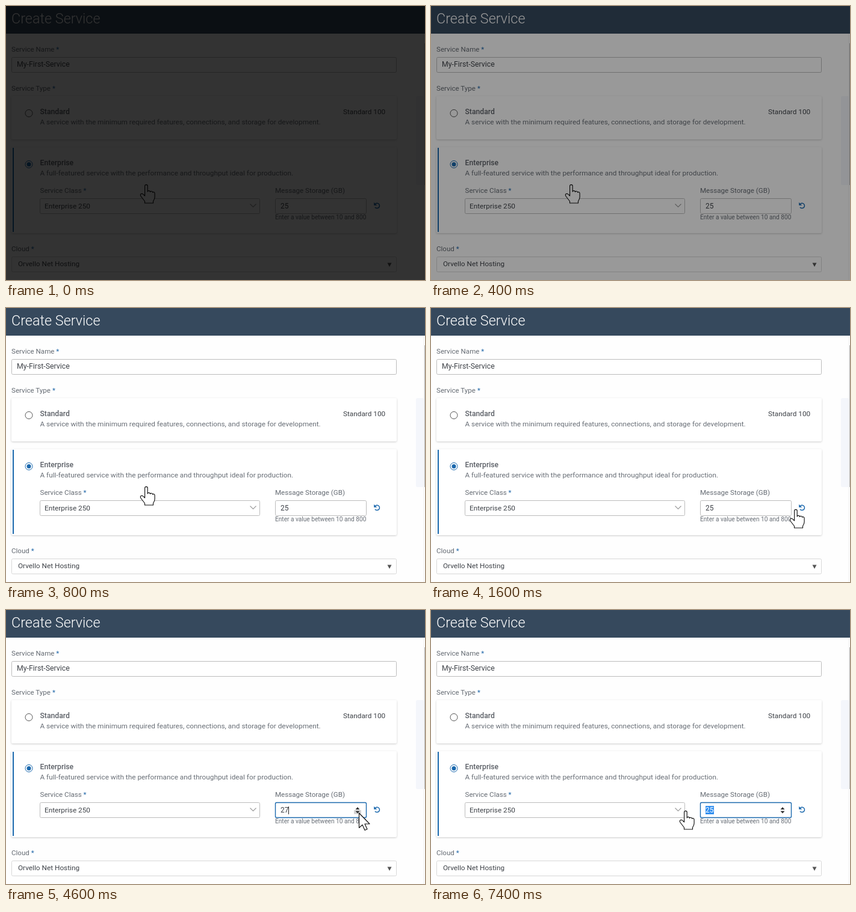
An HTML page that plays this animation: 696 px wide and 456 px high, repeating every 8 s.

```html
<!DOCTYPE html>
<html lang="en">
<head>
<meta charset="utf-8">
<title>Create Service</title>
<style>
  html, body { margin: 0; width: 100%; height: 100%; overflow: hidden; background: #fefefe; }
  svg { display: block; }
  text { font: 11.8px Roboto, sans-serif; fill: #3d4147; }
  .title { font-size: 23.4px; font-weight: 350; fill: #fff; }
  .label { font-size: 11.6px; fill: #666c74; }
  .label tspan { fill: #1f66a8; }
  .name { font-size: 12.2px; font-weight: 500; fill: #5c6067; }
  .note { fill: #686e76; }
  .hint { font-size: 10.15px; fill: #686e76; }
  .field { fill: #fff; stroke: #bcbcbc; }
  .card { fill: #fff; filter: drop-shadow(0 1px 1.5px #0003); }
  .line { fill: none; stroke: #999; stroke-width: 1.1; }
  .blue { fill: #1a68ad; }
  .cursor path { fill: #fff; stroke: #111; stroke-width: 1.15; stroke-linejoin: round; }
</style>
</head>
<body>
<svg width="696" height="456" viewBox="0 0 696 456">
  <rect width="696" height="456" fill="#fefefe"/>
  <rect x="681" y="150" width="13" height="148" rx="2" fill="#f4f6fb"/>
  <path d="M694 46V456" stroke="#f1f1f1"/>
  <path d="M695.5 62V298" stroke="#b4b4b4"/>
  <rect width="696" height="46" fill="#36495d"/>
  <text class="title" x="9" y="29">Create Service</text>

  <text class="label" x="9" y="76">Service Name <tspan>*</tspan></text>
  <rect class="field" x="9.5" y="85.5" width="639" height="25" rx="2"/>
  <text x="18" y="101" style="font-size:12.3px">My-First-Service</text>

  <text class="label" x="9" y="141">Service Type <tspan>*</tspan></text>
  <rect class="card" x="9" y="150" width="640" height="72" rx="2"/>
  <circle cx="38" cy="178.5" r="6" fill="#fff" stroke="#555"/>
  <text class="name" x="56.5" y="180">Standard</text>
  <text class="note" x="56.5" y="197">A service with the minimum required features, connections, and storage for development.</text>
  <text x="560" y="180">Standard 100</text>

  <rect class="card" x="9" y="235" width="640" height="143" rx="2"/>
  <rect class="blue" x="11" y="236" width="2" height="140"/>
  <circle cx="38" cy="263.5" r="6" fill="#fff" stroke="#1a68ad"/>
  <circle class="blue" cx="38" cy="263.5" r="3.5"/>
  <text class="name" x="56.5" y="265">Enterprise</text>
  <text class="note" x="56.5" y="282">A full-featured service with the performance and throughput ideal for production.</text>

  <text class="label" x="56.5" y="311">Service Class <tspan>*</tspan></text>
  <rect class="field" x="56.5" y="320.5" width="365" height="25" rx="2"/>
  <text x="64" y="337">Enterprise 250</text>
  <path class="line" d="M405.5 329.5l5 5 5-5"/>

  <text class="label" x="447" y="311">Message Storage (GB)</text>
  <rect id="storage" class="field" x="447.5" y="320.5" width="151" height="25" rx="2"/>
  <rect id="selection" x="456" y="326" width="14" height="14" fill="#3390f0"/>
  <text id="value" x="456" y="337" style="font-size:12px"></text>
  <path id="caret" d="M469.5 327V340" stroke="#222"/>
  <g id="spinner">
    <rect id="hover" x="578" width="12" height="6.5" fill="#d2d2d2"/>
    <path d="M580.5 332l3.500-4 3.500 4zM580.5 334.500l3.500 4 3.500-4z" fill="#333"/>
  </g>
  <text class="hint" x="447" y="355">Enter a value between 10 and 800</text>
  <path d="M613.5 329.2A4.2 4.2 0 1 1 613 335" fill="none" stroke="#1a68ad" stroke-width="1.5"/>
  <path class="blue" d="M611.2 326.8v5h5z"/>

  <text class="label" x="9" y="408">Cloud <tspan>*</tspan></text>
  <rect class="field" x="9.5" y="417.5" width="639" height="25" rx="2" style="stroke:#d8d8d8"/>
  <text x="20" y="433">Orvello Net Hosting</text>
  <path d="M633.5 427.5h7l-3.5 6.5z" fill="#555"/>

  <g id="cursor" class="cursor">
    <path id="hand" d="M-2.4 19V2.6a2.3 2.3 0 0 1 4.6 0V12q.4-1.7 2.2-1.6 2 .1 2.1 2 .6-1.3 2.1-1.1 1.8.2 1.9 2 .6-1 1.9-.7 1.7.4 1.7 2.2V21q0 3-2.6 7V31H-2.5V28L-9 19.5q-1.7-3 .6-4 2.2-.7 4 1.5z"/>
    <path id="arrow" d="M0 0V24.5l5.5-5 4 9 4-1.7-4-8.8h8z"/>
  </g>
  <rect id="shade" width="696" height="456"/>
</svg>
<script>
const LOOP = 8000, STEP = 200;
const $ = id => document.getElementById(id);
const show = (id, on) => $(id).setAttribute("visibility", on ? "visible" : "hidden");

// Pointer tip: [time, x, y]
const path = [
  [800, 233, 297], [1600, 606, 335], [2200, 587, 328], [3200, 587, 328],
  [3600, 586.5, 338], [4800, 586.5, 338], [5400, 618, 334], [6200, 618, 334], [7400, 423, 334]
];
// Storage value: [time, value]
const values = [[0, 25], [2600, 26], [2800, 27], [3000, 28], [3800, 27], [5800, 25]];

function pointerAt(t) {
  const next = path.findIndex(p => p[0] > t);
  if (next < 1) return (next ? path[path.length - 1] : path[0]).slice(1);
  const a = path[next - 1], b = path[next];
  const u = (t - a[0]) / (b[0] - a[0]), ease = u * u * (3 - 2 * u);
  return [1, 2].map(i => a[i] + (b[i] - a[i]) * ease);
}

function draw(t) {
  const [x, y] = pointerAt(t);
  const focused = t >= 2600, selected = t >= 5800;
  const arrow = t >= 1800 && t < 5000;
  const hovering = arrow && x < 590;

  $("shade").setAttribute("opacity", Math.max(0, 0.8 - t / 1000));
  $("cursor").setAttribute("transform", `translate(${x} ${y})`);
  show("arrow", arrow);
  show("hand", !arrow);

  $("value").textContent = values.filter(v => v[0] <= t).pop()[1];
  $("value").style.fill = selected ? "#fff" : "";
  $("storage").style.stroke = focused ? "#1a68ad" : "";
  $("storage").style.strokeWidth = focused ? 1.4 : 1;
  show("selection", selected);
  show("caret", focused && !selected);
  show("spinner", focused || hovering);
  show("hover", hovering);
  $("hover").setAttribute("y", y < 333 ? 326.5 : 333);
}

function tick() {
  const t = performance.now() % LOOP;
  draw(Math.floor(t / STEP) * STEP);
  requestAnimationFrame(tick);
}
tick();
</script>
</body>
</html>
```
